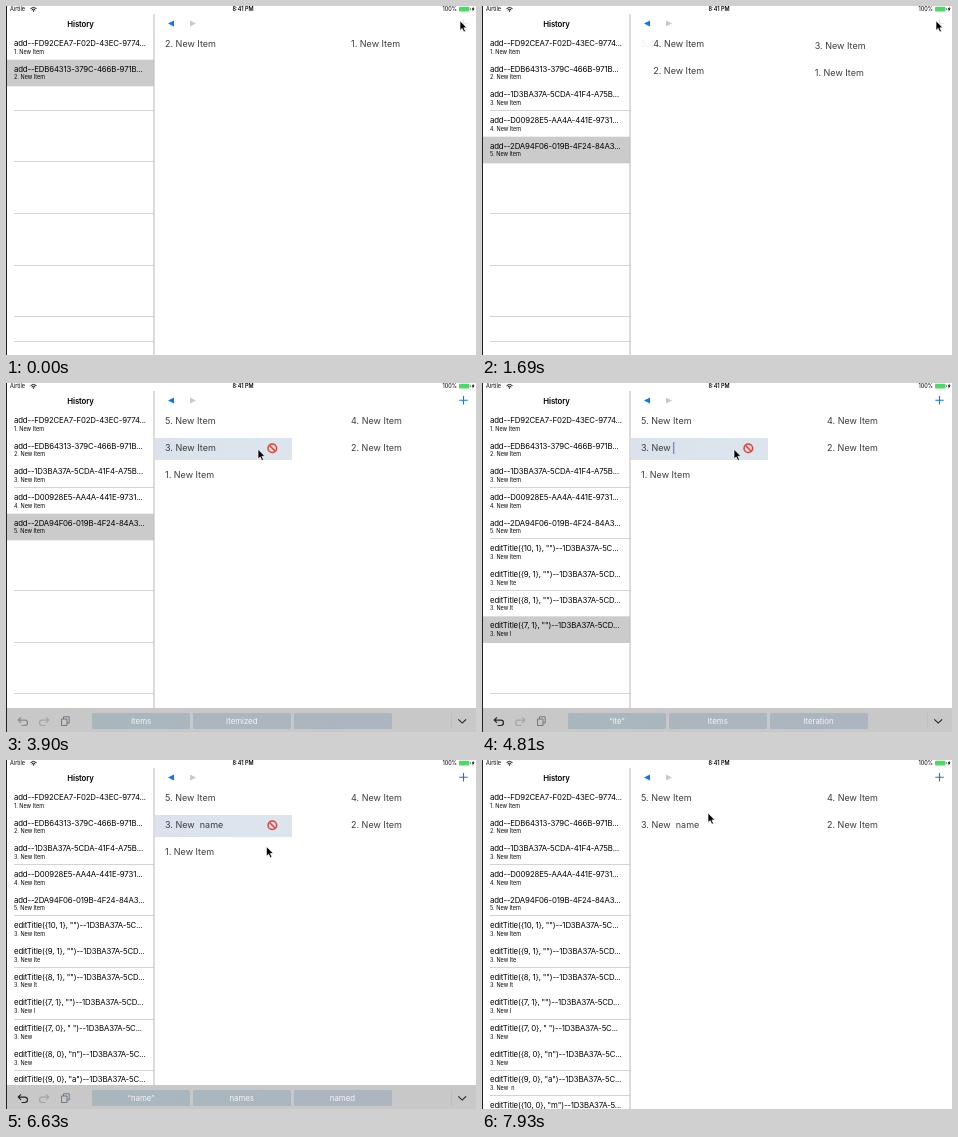
These frames come from a looping animation (470x349 px, 8000 ms). An HTML page:

```html
<!DOCTYPE html>
<html>
<head>
<meta charset="utf-8">
<style>
  html, body { margin: 0; width: 100%; height: 100%; overflow: hidden; background: #fff; }
  svg { display: block; width: 100%; height: 100%; }
  text { font-family: Inter, Roboto, sans-serif; white-space: pre; }
  .status, .sub { font-size: 5.5px; }
  .title { font-size: 7.8px; letter-spacing: -.02em; }
  .item { font-size: 9px; fill: #3c3c3c; }
  .word { font-size: 7.8px; fill: #f4f5f8; text-anchor: middle; }
</style>
</head>
<body>
<svg viewBox="0 0 470 349">
  <defs>
    <linearGradient id="field" x2="1" y2="0">
      <stop stop-color="#dbe2ed"/><stop offset="1" stop-color="#dce5ed"/>
    </linearGradient>
    <linearGradient id="pills" gradientUnits="userSpaceOnUse" x1="86" x2="386" y1="0" y2="0">
      <stop stop-color="#a9b7bd"/><stop offset="1" stop-color="#adb5c0"/>
    </linearGradient>
  </defs>
  <g id="scene"></g>
</svg>
<script>
const LOOP = 8000, STEP = 130;
const ROW_TOP = 28, ROW_HEIGHT = 25.67;
const scene = document.getElementById('scene');
const measure = document.createElement('canvas').getContext('2d');

const addTimes = [83, 863, 1643];
const addIds = ['FD92CEA7-F02D-43EC-9774', 'EDB64313-379C-466B-971B',
  '1D3BA37A-5CDA-41F4-A75B', 'D00928E5-AA4A-441E-9731', '2DA94F06-019B-4F24-84A3'];

// [time, caret position, typed character ('' deletes), visible id]
const edits = [
  [4160, 10, '', '5C'], [4420, 9, '', '5CD'], [4550, 8, '', '5CD'], [4810, 7, '', '5CD'],
  [5070, 7, ' ', '5C'], [5330, 8, 'n', '5C'], [5590, 9, 'a', '5C'],
  [5850, 10, 'm', '5'], [5980, 11, 'e', '5']
];
const suggestions = [
  [0, 'Items', 'Itemized', ''], [4290, '“ite”', 'Items', 'Iteration'],
  [5070, 'to', 'update', 'and'], [5980, '“name”', 'names', 'named'],
  [6890, 'Items', 'Itemized', '']
];
const cursorPath = [
  [0, 454, 14.8], [1950, 454, 14.8], [2340, 292, 57], [2600, 252, 66.3],
  [6240, 252, 66.3], [6760, 262, 90.3], [7670, 262, 90.3], [7930, 226, 53]
];
const barPath = [
  [0, 24], [3250, 24], [3640, 0], [6890, 0], [7020, 24],
  [7280, 24], [7410, 0], [7670, 0], [7930, 24]
];

const between = (t, a, b) => t >= a && t < b;
const ease = x => { x = Math.min(1, Math.max(0, x)); return x * x * (3 - 2 * x); };
const mix = (a, b, p) => a + (b - a) * p;

function track(keys, t) {
  const next = keys.findIndex(k => k[0] > t);
  if (next < 0) return keys[keys.length - 1].slice(1);
  const a = keys[next - 1], b = keys[next];
  const p = ease((t - a[0]) / (b[0] - a[0]));
  return a.slice(1).map((v, i) => mix(v, b[i + 1], p));
}

const text = (cls, x, y, s, extra = '') => `<text class="${cls}" x="${x}" y="${y}" ${extra}>${s}</text>`;
const rect = (x, y, w, h, fill, extra = '') =>
  `<rect x="${x}" y="${y}" width="${w}" height="${h}" fill="${fill}" ${extra}/>`;
const path = (d, stroke, width = 1, extra = '') =>
  `<path d="${d}" fill="none" stroke="${stroke}" stroke-width="${width}" ${extra}/>`;

function applyEdits(t) {
  let name = 'New Item';
  const rows = [];
  for (const [time, at, char, id] of edits) {
    if (time > t) break;
    const before = name;
    name = char ? name + char : name.slice(0, -1);
    rows.push([`editTitle({${at}, ${char ? 0 : 1}}, "${char}")--1D3BA37A-${id}...`, '3. ' + before]);
  }
  return { name, rows };
}

function sidebar(count, editRows) {
  const rows = addIds.slice(0, count)
    .map((id, i) => [`add--${id}...`, `${i + 1}. New Item`]).concat(editRows);
  let out = '';
  for (const y of [104, 155, 207, 259, 310, 335]) out += rect(8, y, 140, 1, '#d4d4d6');
  out += rect(1, ROW_TOP + ROW_HEIGHT * (rows.length - 1), 147, ROW_HEIGHT + 1, '#cbcbcb');
  rows.forEach(([title, sub], i) => {
    const y = ROW_TOP + ROW_HEIGHT * i;
    out += text('title', 8, y + 12, title) + text('sub', 8, y + 19.8, sub);
  });
  return out + rect(0, 0, 1, 349, '#222') + rect(147.5, 8, 1, 341, '#b9b9bb') +
    text('title', 74.5, 20.6, 'History', 'text-anchor="middle" font-weight="600"');
}

function header(t) {
  const dim = between(t, 0, 520) || between(t, 780, 1300) || between(t, 1560, 2080);
  return text('status', 4, 5, 'Airtile') +
    path('M24.5 2.6q3 -2.4 6 0M25.7 4q1.8 -1.4 3.6 0', '#111', 1) +
    '<circle cx="27.5" cy="5" r=".7"/>' +
    text('status', 237, 5, '8:41 PM', 'text-anchor="middle" font-weight="600"') +
    text('status', 451, 5, '100%', 'text-anchor="end"') +
    rect(453, .7, 10.5, 4.8, '#4cd964', 'rx="1"') + rect(464, 2.2, .8, 1.8, '#777') +
    '<path d="M467.6 .5l-2 2.9h1.3l-.5 2.3l2.2 -3.1h-1.3z"/>' +
    '<path d="M162 17.5l6 -3v6z" fill="#007aff"/><path d="M190 17.5l-6 -3v6z" fill="#c9c9c9"/>' +
    path('M453.3 17.2h8.4M457.5 13v8.4', '#007aff', 1.1, `opacity="${dim ? .18 : 1}"`);
}

function grid(t, name) {
  const added = addTimes.filter(a => a <= t);
  const count = 2 + added.length;
  const p = added.length ? ease((t - added[added.length - 1]) / 300) : 1;
  const place = index => [159 + 186 * (index % 2), 41 + 27 * Math.floor(index / 2)];
  const active = between(t, 3250, 6890) ? 3 : between(t, 7280, 7800) ? 1 : 0;
  const caretOn = !between(t, 3900, 4160) && !between(t, 6370, 6760);
  let out = '';
  for (let k = 1; k <= count; k++) {
    if (k === 1 && t >= 7800) continue;
    const end = place(count - k), fresh = k === count;
    const start = fresh ? end : place(count - 1 - k);
    const x = mix(start[0], end[0], p), y = mix(start[1], end[1], p);
    const label = `${k}. ${k === 3 ? name : 'New Item'}`;
    if (k === active) {
      out += rect(149, y - 13, 137, 22, 'url(#field)') +
        `<circle cx="266.3" cy="${y - 2.7}" r="4.3" fill="#f3dcdc" stroke="#d8433c" stroke-width="1.5"/>` +
        path(`M263.3 ${y - 5.7}l6 6`, '#d8433c', 1.5);
    }
    out += text('item', x, y, label, `opacity="${fresh ? p : 1}"`);
    if (k === active && caretOn) {
      measure.font = '9px Inter, Roboto, sans-serif';
      out += rect(x + measure.measureText(label).width, y - 9, 1, 12, '#4567e8');
    }
  }
  return out;
}

function keyboardBar(t) {
  const [offset] = track(barPath, t);
  if (offset >= 24) return '';
  const words = suggestions.filter(s => s[0] <= t).pop().slice(1);
  const undo = between(t, 4160, 6890) ? '#222' : '#85878b';
  const arrow = 'M15 334.3l-2.8 2.8l2.8 2.8M12.4 337.1h6.4a2.7 2.7 0 0 1 0 5.4h-3.2';
  let out = rect(1, 325, 469, 24, '#c8c8c9') + rect(445, 330, .6, 16, '#b7b7ba') +
    path(arrow, undo, 1.1) +
    path(arrow, '#a2a4a8', 1.1, 'transform="matrix(-1 0 0 1 55 0)"') +
    path('M57.5 336v-2.2h5.7v6.2h-2M55.5 336h5.5v6.5h-5.5z', '#66707e', .9) +
    path('M452.3 336.3l3.9 3.8l3.9 -3.8', '#222', 1.1);
  words.forEach((word, i) => {
    out += rect(86 + 101 * i, 330, 98, 16, 'url(#pills)', 'rx="1.5"') +
      text('word', 135 + 100.7 * i, 341, word);
  });
  return `<g transform="translate(0 ${offset})">${out}</g>`;
}

function cursor(t) {
  const [x, y] = track(cursorPath, t);
  return `<path transform="translate(${x} ${y})" d="M0 0v9.6l2.2 -2l1.6 3.6l1.7 -.8l-1.6 -3.4h3z"
    fill="#000" stroke="#fff" stroke-width=".7"/>`;
}

function draw() {
  const t = Math.floor((performance.now() % LOOP) / STEP) * STEP;
  const { name, rows } = applyEdits(t);
  const count = 2 + addTimes.filter(a => a <= t).length;
  scene.innerHTML = rect(0, 0, 470, 349, '#fff') + sidebar(count, rows) + header(t) +
    grid(t, name) + keyboardBar(t) + cursor(t);
  requestAnimationFrame(draw);
}
draw();
</script>
</body>
</html>
```
